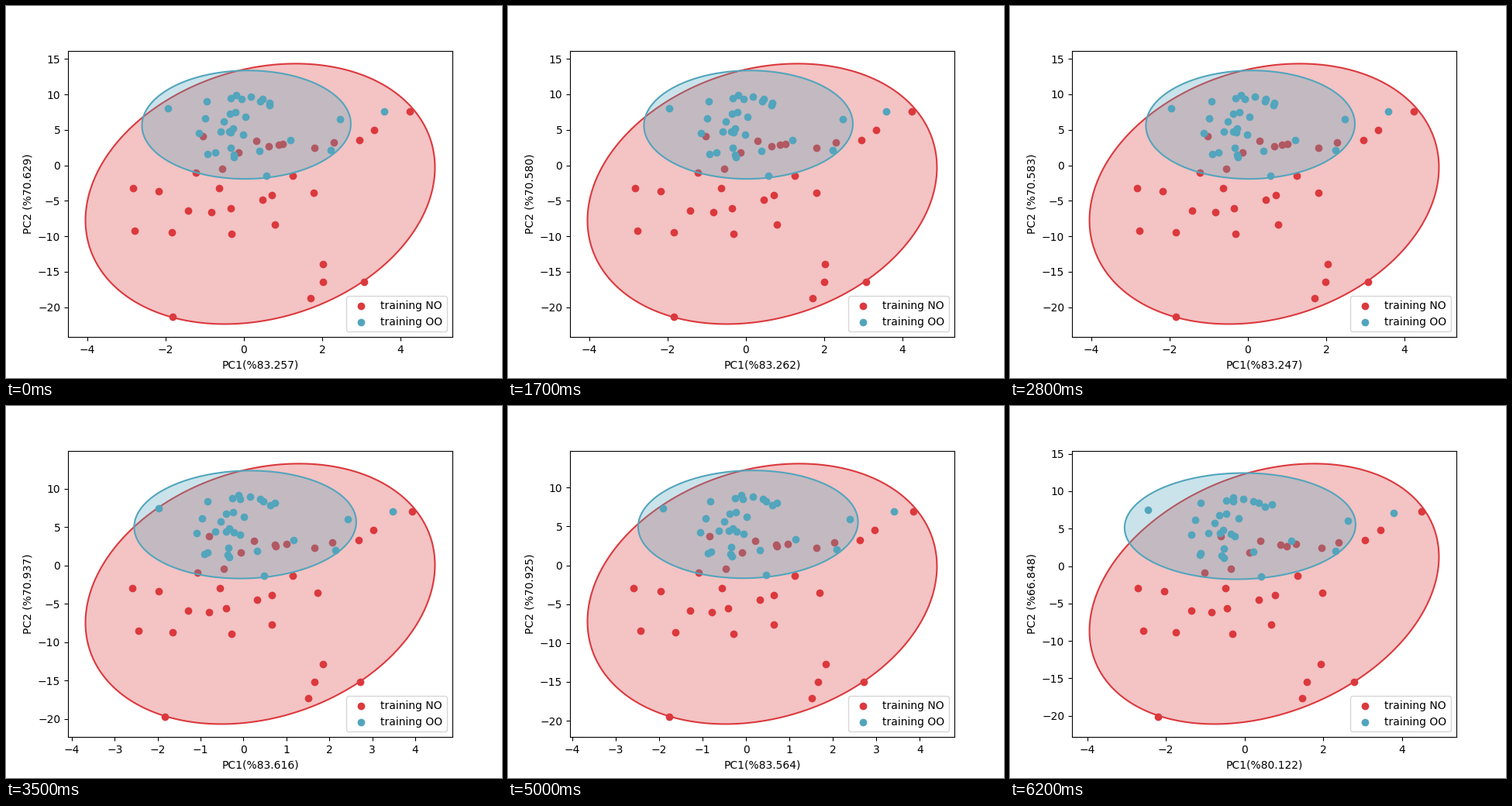
Recreate the animation shown at these times as a matplotlib script. Size 640 by 480 pixels, loop 6.3 s.

```python
import numpy as np
import matplotlib.pyplot as plt
from matplotlib.animation import FuncAnimation
from matplotlib.patches import Polygon

plt.rcParams["font.family"] = "DejaVu Sans"

FRAMES, INTERVAL = 63, 100
RED, BLUE = "#db393d", "#52a5bc"

# Key frames with the progress through the ellipse shapes, the explained
# variance and how far the samples have wandered.
KEYS = [0, 8, 17, 28, 42, 50, 62]
STAGE = [0, 0.003, 0.006, 0.01, 1, 2, 3]
PC1 = [83.257, 83.271, 83.262, 83.247, 83.669, 83.564, 80.122]
PC2 = [70.629, 70.607, 70.580, 70.583, 70.988, 70.925, 66.848]
WANDER = [0, 0.005, 0.01, 0.015, 0.07, 0.06, 0.1]

# Successive ellipses: centre x, centre y, half width, half height, correlation.
NO_SHAPES = [(0.417, -4.029, 4.467, 18.357, 0.203),
             (0.385, -3.673, 4.015, 16.766, 0.225),
             (0.371, -3.673, 4.022, 16.766, 0.212),
             (0.499, -3.716, 4.442, 17.391, 0.285)]
OO_SHAPES = [(0.064, 5.722, 2.669, 7.638, 0.015),
             (0.036, 5.250, 2.575, 6.936, 0.050),
             (0.046, 5.280, 2.530, 6.936, 0.045),
             (-0.114, 5.331, 2.936, 7.091, 0.030)]

# Samples at the start, in stage pixels.
NO_SAMPLES = [
    (164, 235), (197, 239), (166, 290), (214, 292), (215, 401), (235, 264), (265, 266),
    (275, 235), (290, 261), (291, 294), (245, 215), (254, 168), (279, 210), (300, 189),
    (323, 174), (339, 181), (352, 179), (357, 178), (398, 183), (423, 176), (456, 173),
    (475, 160), (521, 136), (370, 219), (397, 241), (331, 250), (343, 244), (347, 282),
    (409, 333), (409, 356), (462, 356), (393, 377)]
OO_SAMPLES = [
    (209, 132), (259, 123), (257, 145), (249, 164), (260, 191), (270, 189), (277, 162),
    (281, 149), (290, 119), (297, 115), (304, 120), (316, 117), (289, 139), (296, 137),
    (309, 143), (288, 162), (290, 163), (293, 158), (306, 166), (290, 183), (294, 192),
    (294, 195), (327, 187), (328, 123), (331, 120), (340, 125), (340, 128), (336, 219),
    (367, 173), (419, 186), (431, 146), (488, 136)]

# The axes always fit the larger ellipse, so its stage box is fixed.
BOX_CENTRE = np.array([328, 242.4])
BOX_HALF = np.array([225.45, -168])
MARGIN = 1.1

rng = np.random.default_rng(4)


def to_data(pixels):
    cx, cy, a, b, _ = NO_SHAPES[0]
    return (cx, cy) + (np.array(pixels) - BOX_CENTRE) / BOX_HALF * (a, b)


def from_unit(unit, shape):
    """Map the unit disc onto a tilted ellipse."""
    cx, cy, a, b, r = shape
    x, y = unit.T
    return np.column_stack([cx + a * (r * y + np.sqrt(1 - r * r) * x), cy + b * y])


def to_unit(data, shape):
    cx, cy, a, b, r = shape
    x, y = ((data - (cx, cy)) / (a, b)).T
    return np.column_stack([(x - r * y) / np.sqrt(1 - r * r), y])


def shape_at(shapes, stage):
    return [np.interp(stage, range(len(shapes)), part) for part in zip(*shapes)]


def key_position(frame):
    """Position among the keys: the first jump eases out, the last eases in."""
    i = min(np.searchsorted(KEYS, frame, side="right"), len(KEYS) - 1) - 1
    u = (frame - KEYS[i]) / (KEYS[i + 1] - KEYS[i])
    if i == 3:
        u = 1 - (1 - u) ** 3
    elif i == 5:
        u = u ** 3
    return i + u


def value_at(values, position):
    return np.interp(position, range(len(values)), values)


turn = np.linspace(0, 2 * np.pi, 240, endpoint=False)
CIRCLE = np.column_stack([np.sin(turn), np.cos(turn)])


class Group:
    """Samples that keep their place within their moving ellipse."""

    def __init__(self, ax, label, color, shapes, samples):
        self.shapes = shapes
        self.unit = to_unit(to_data(samples), shapes[0])
        self.drift = rng.normal(0, 1, len(samples))
        self.dots = ax.scatter([], [], color=color, label=label)
        self.area = Polygon(CIRCLE, facecolor=(color, 0.3), edgecolor=color, lw=1.5)
        ax.add_patch(self.area)

    def move(self, stage, wander):
        shape = shape_at(self.shapes, stage)
        spots = from_unit(self.unit, shape)
        spots[:, 0] += wander * self.drift
        self.dots.set_offsets(spots)
        self.area.set_xy(from_unit(CIRCLE, shape))


fig, ax = plt.subplots(figsize=(6.4, 4.8), dpi=100)
groups = [Group(ax, "training NO", RED, NO_SHAPES, NO_SAMPLES),
          Group(ax, "training OO", BLUE, OO_SHAPES, OO_SAMPLES)]
ax.legend(loc="lower right")


def update(frame):
    position = key_position(frame)
    stage = value_at(STAGE, position)
    for group in groups:
        group.move(stage, value_at(WANDER, position))
    cx, cy, a, b, _ = shape_at(NO_SHAPES, stage)
    ax.set_xlim(cx - MARGIN * a, cx + MARGIN * a)
    ax.set_ylim(cy - MARGIN * b, cy + MARGIN * b)
    ax.set_xlabel(f"PC1(%{value_at(PC1, position):.3f})")
    ax.set_ylabel(f"PC2 (%{value_at(PC2, position):.3f})")


anim = FuncAnimation(fig, update, frames=FRAMES, interval=INTERVAL,
                     init_func=lambda: update(0), repeat=True, repeat_delay=0)
plt.show()
```
